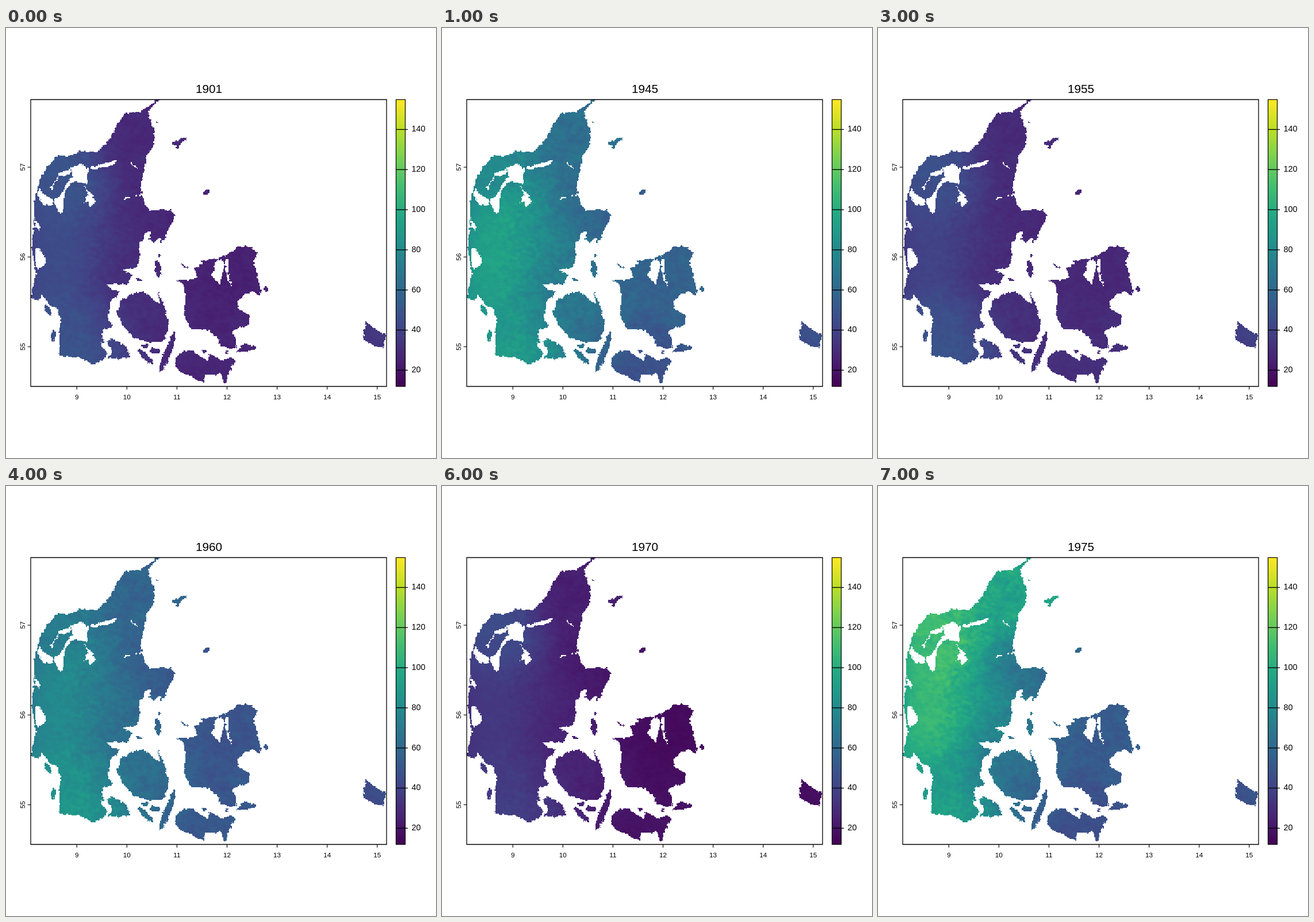
These frames come from a looping animation (748x748 px, 8000 ms). An HTML page with a canvas:

```html
<!DOCTYPE html>
<html lang="en">
<head>
<meta charset="utf-8">
<title>Yearly map</title>
<style>
  html, body { margin: 0; width: 100%; height: 100%; overflow: hidden; background: #fff; }
  canvas, svg { position: absolute; left: 0; top: 0; width: 748px; height: 748px; }
  text { font-family: "Liberation Sans", Arial, sans-serif; text-anchor: middle; }
</style>
</head>
<body>
<canvas id="map" width="748" height="748"></canvas>
<svg id="axes" viewBox="0 0 748 748"></svg>
<script>
const LEFT = 43, TOP = 124.5, CELL = 1.5, COLS = 413, ROWS = 333, STEP = 1000;

// Coastlines, in stage pixels
const westCoast = `259,125 247,137 229,147 207,148 191,172 178,196 160,215 126,215 108,224 90,221
  70,243 58,264 49,303 48,345 45,385 52,425 43,467 57,475 62,463 78,484 90,486 94,505 92,570 131,574
  151,584 168,577`;
const eastCoast = `176,565 161,549 171,547 166,535 168,524 186,520 177,505 183,475 200,458 184,456
  174,445 211,446 220,428 201,421 228,416 234,390 230,374 240,367 242,356 252,353 249,367 257,372
  270,363 270,375 284,350 294,327 287,317 250,317 241,305 234,278 244,222 257,206 258,178 247,150
  252,138 267,125`;
const zealand = `321,399 335,404 365,402 385,394 404,379 420,380 439,390 430,405 443,455 442,466
  430,458 415,463 402,476 404,490 424,499 420,517 402,522 391,530 399,536 401,554 390,558 370,550
  372,542 352,525 320,523 310,500 312,455 304,442 288,438 312,438 333,435 326,420 343,408`;
const lolland = `294,587 295,573 310,561 325,560 332,568 351,578 353,566 375,578 390,573 399,579
  386,601 382,623 377,612 375,602 346,605 343,617 320,605 303,598`;
const fyn = `199,475 218,462 240,458 254,470 268,480 263,457 273,479 281,505 282,525 272,547 252,548
  220,537 202,515 193,493`;
const als = '175,545 185,541 208,553 216,573 198,576 177,573 186,565';
const mon = '408,555 413,548 433,553 432,561 403,563 397,570';
const bornholm = '626,509 643,524 660,534 655,556 638,552 620,540';
const laeso = '287,198 301,195 304,191 315,190 298,210';

// Small islands: x, y, half width, half height, tilt
const islets = [
  [259, 561, 9, 5, 0], [242, 571, 18, 5, .75], [281, 564, 37, 6, -1.2], [264, 419, 16, 5, 1.5],
  [348, 286, 6, 3, -.5], [73, 490, 11, 4, 1.1], [82, 535, 11, 4, 1.7], [452, 454, 5, 2, 1.5],
  [310, 414, 7, 2, .6], [231, 438, 4, 2, 0], [359, 367, 1, 1, 0], [264, 165, 2, 1, 0], [266, 397, 3, 2, 0],
  [345, 562, 4, 3, 0], [241, 553, 7, 3, 0], [384, 563, 3, 2, 0]
];

const lagoons = ['57,279 66,290 82,299 80,308 66,308 54,291', '50,381 60,387 69,402 67,412 55,420 50,400',
  '49,331 60,346 57,351 50,344'];
const sounds = [
  `113,243 130,236 144,244 139,262 141,270 116,267 104,281 100,299 99,322 91,321 82,300 94,291
   110,262 116,258`,
  '91,255 97,248 115,243 108,257', '129,267 150,290 155,304 145,311 142,299 130,312 143,286',
  '146,243 172,235 194,228 183,240 150,246'
];
const inlets = ['366,403 374,402 380,412 372,447 357,432', '380,404 386,401 386,425 393,450 384,436'];
const channels = ['215,233 229,244', '206,296 218,294', '223,292 241,288', '93,257 79,276 80,284'];

// Stations, and their values for each year
const stations = [[225, 185], [82, 240], [105, 370], [285, 335], [220, 390], [140, 555], [240, 510], [350, 585], [380, 450], [640, 535]];
const years = [
  [1901, 28, 50, 46, 27, 30, 49, 29, 27, 25, 34],
  [1945, 64, 80, 96, 54, 73, 90, 64, 47, 57, 46],
  [1950, 56, 70, 77, 46, 58, 79, 55, 46, 48, 46],
  [1955, 29, 48, 41, 28, 29, 49, 30, 31, 28, 38],
  [1960, 58, 72, 81, 49, 63, 87, 62, 51, 49, 44],
  [1965, 67, 85, 98, 53, 73, 108, 74, 57, 52, 39],
  [1970, 24, 46, 36, 20, 26, 38, 25, 19, 16, 17],
  [1975, 95, 111, 110, 59, 79, 93, 59, 46, 53, 47]
];

const viridis = ['440154', '482475', '414487', '355f8d', '2a788e', '21918c', '22a884', '44bf70', '7ad151', 'bddf26', 'fde725'];
const rgb = viridis.map(h => [0, 2, 4].map(i => parseInt(h.slice(i, i + 2), 16)));

function colour(value) {
  const t = Math.min(9.999, Math.max(0, (value - 12) / 142.8 * 10));
  const i = Math.floor(t), f = t - i;
  return rgb[i].map((c, k) => c + (rgb[i + 1][k] - c) * f);
}

function hash(x, y) {
  const s = Math.sin(x * 127.1 + y * 311.7) * 43758.5453;
  return s - Math.floor(s);
}

// Smooth value noise in -1..1
function noise(x, y) {
  const i = Math.floor(x), j = Math.floor(y);
  const ease = t => t * t * (3 - 2 * t), u = ease(x - i), v = ease(y - j);
  const a = hash(i, j) * (1 - u) + hash(i + 1, j) * u;
  const b = hash(i, j + 1) * (1 - u) + hash(i + 1, j + 1) * u;
  return (a + (b - a) * v) * 2 - 1;
}

function newCanvas() {
  const c = document.createElement('canvas');
  c.width = COLS;
  c.height = ROWS;
  return c;
}

function landMask() {
  const g = newCanvas().getContext('2d', { willReadFrequently: true });
  g.scale(1 / CELL, 1 / CELL);
  g.translate(-LEFT, -TOP);
  const fill = pts => g.fill(new Path2D('M' + pts + 'Z'));
  [westCoast + ' ' + eastCoast, zealand, lolland, fyn, als, mon, bornholm, laeso].forEach(fill);
  for (const [x, y, rx, ry, tilt] of islets) {
    g.beginPath();
    g.ellipse(x, y, rx, ry, tilt, 0, 7);
    g.fill();
  }
  g.globalCompositeOperation = 'destination-out';
  [...lagoons, ...sounds, ...inlets].forEach(fill);
  g.lineWidth = 1.9;
  channels.forEach(pts => g.stroke(new Path2D('M' + pts)));
  const data = g.getImageData(0, 0, COLS, ROWS).data;
  return (i, j) => i >= 0 && j >= 0 && i < COLS && j < ROWS && data[(j * COLS + i) * 4 + 3] > 120;
}

function landCells() {
  const land = landMask(), cells = [];
  for (let j = 0; j < ROWS; j++) for (let i = 0; i < COLS; i++) {
    // ragged coast
    const di = Math.round(noise(i / 2.3, j / 2.3) * 1.15), dj = Math.round(noise(i / 2.3 + 50, j / 2.3) * 1.15);
    if (!land(i + di, j + dj)) continue;
    const x = LEFT + (i + .5) * CELL, y = TOP + (j + .5) * CELL;
    const w = stations.map(([sx, sy]) => Math.exp(-((x - sx) ** 2 + (y - sy) ** 2) / 5000) + 1e-12);
    const sum = w.reduce((a, b) => a + b);
    const hills = .025 + .035 * Math.min(1, Math.max(0, (x - 70) / 70));
    const relief = noise((x + y * .5) / 7, (y - x * .4) / 5) + .7 * noise(x / 15 + 9, y / 15) + .4 * noise(x / 3.5, y / 3.5);
    const shore = y > 260 ? .12 * Math.exp(-(x - 45) / 22) : 0;
    cells.push({ at: (j * COLS + i) * 4, w: w.map(v => v / sum), gain: 1 + hills * relief - shore });
  }
  return cells;
}

function paintYear(cells, values) {
  const c = newCanvas(), g = c.getContext('2d'), img = g.createImageData(COLS, ROWS);
  for (const { at, w, gain } of cells) {
    const v = w.reduce((s, k, n) => s + k * values[n], 0) * gain;
    img.data.set([...colour(v), 255], at);
  }
  g.putImageData(img, 0, 0);
  return c;
}

// Axes, labels and colour bar
const svg = document.getElementById('axes');
function add(name, attrs, text, parent = svg) {
  const e = document.createElementNS('http://www.w3.org/2000/svg', name);
  for (const k in attrs) e.setAttribute(k, attrs[k]);
  if (text !== undefined) e.textContent = text;
  return parent.appendChild(e);
}
const line = (d, width = 1.3) => add('path', { d, stroke: '#000', 'stroke-width': width, fill: 'none' });

const ramp = add('linearGradient', { id: 'ramp', x1: 0, y1: 1, x2: 0, y2: 0 });
viridis.forEach((h, i) => add('stop', { offset: i / 10, 'stop-color': '#' + h }, undefined, ramp));
add('rect', { x: 678.5, y: 124.5, width: 16, height: 499, fill: 'url(#ramp)', stroke: '#000', 'stroke-width': 1.2 });
for (let v = 20; v <= 140; v += 20) {
  const y = 595.3 - (v - 20) * 3.49;
  line(`M678.5 ${y}H699`);
  add('text', { x: 705.5, y: y + 3.8, 'font-size': 14.4, style: 'text-anchor:start' }, v);
}
line('M43 124.5H662V623.5H43Z');
for (let d = 9; d <= 15; d++) {
  const x = 123.2 + (d - 9) * 87.1;
  line(`M${x} 623.5v5.5`, 1.1);
  add('text', { x, y: 645.6, 'font-size': 11.7 }, d);
}
for (let d = 55; d <= 57; d++) {
  const y = 554.5 - (d - 55) * 156.2;
  line(`M43 ${y}h-5.5`, 1.1);
  add('text', { transform: `translate(33.2 ${y}) rotate(-90)`, 'font-size': 11.7 }, d);
}
const title = add('text', { x: 353, y: 113.3, 'font-size': 20.7 }, years[0][0]);

const ctx = document.getElementById('map').getContext('2d');
const cells = landCells();
const maps = years.map(([, ...values]) => paintYear(cells, values));
let shown = -1;

function draw(now) {
  const n = Math.floor(now / STEP) % years.length;
  if (n === shown) return;
  shown = n;
  title.textContent = years[n][0];
  ctx.clearRect(0, 0, 748, 748);
  ctx.imageSmoothingEnabled = false;
  ctx.drawImage(maps[n], LEFT, TOP, COLS * CELL, ROWS * CELL);
}
const start = performance.now();
function tick() {
  draw(performance.now() - start);
  requestAnimationFrame(tick);
}
tick();
</script>
</body>
</html>
```
